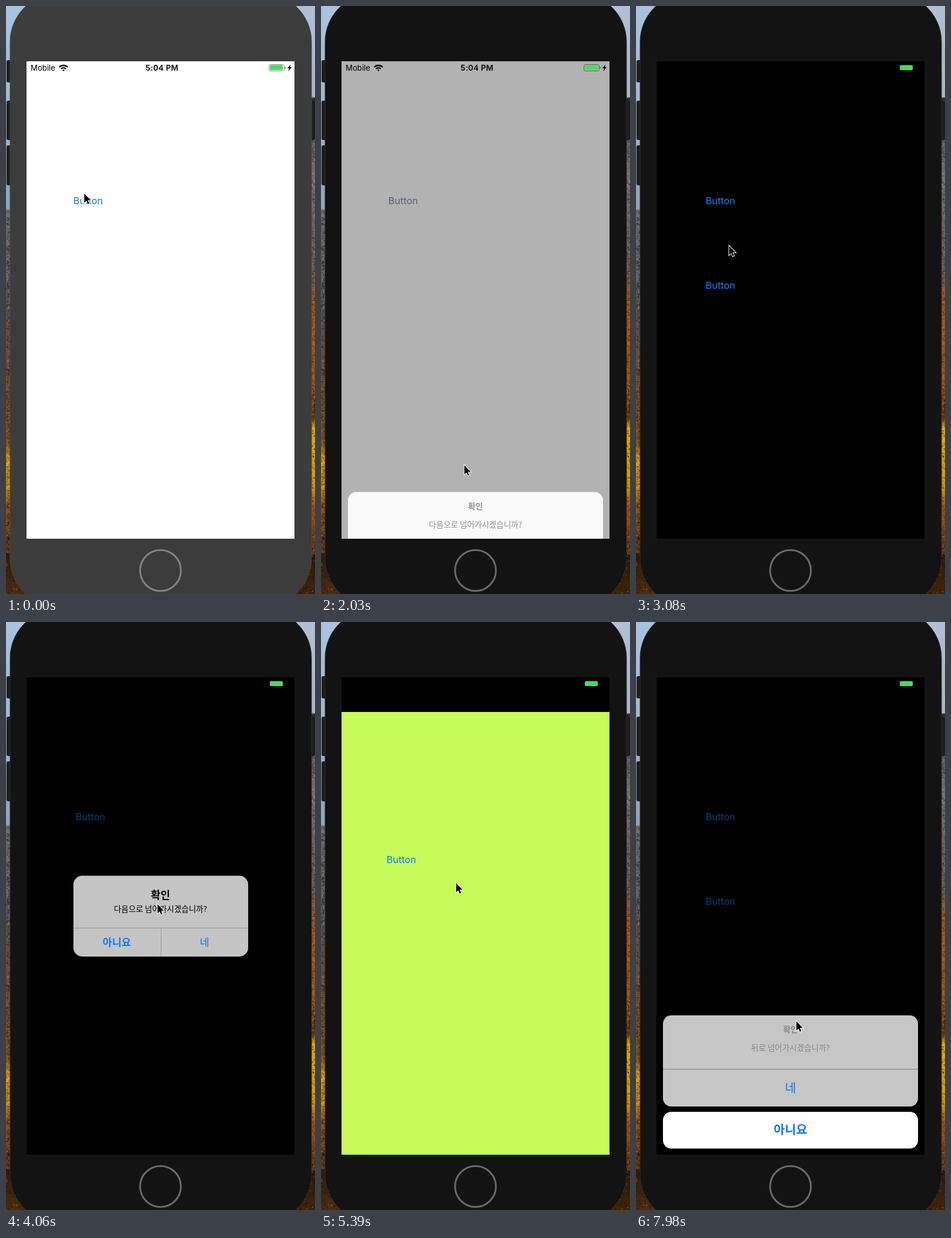
Animation, 527 px wide and 1000 px high, one loop 8000 ms. Source, as an HTML page with a canvas:

```html
<!DOCTYPE html>
<html lang="ko">
<head>
<meta charset="utf-8">
<style>
html, body { margin: 0; width: 100%; height: 100%; overflow: hidden; background: #222 }
canvas { display: block }
</style>
</head>
<body>
<canvas id="stage" width="527" height="1000"></canvas>
<script>
const ctx = document.getElementById('stage').getContext('2d');
const LOOP = 8000, STEP = 70;
const SCREEN = { x: 35, y: 94, w: 457, h: 812 };
const LATIN = 'Inter, sans-serif';
const KOREAN = '"Noto Sans CJK KR", "Noto Sans CJK", sans-serif';
const LIME = '#c6fb5a', BLUE = '#0a7aff';

// Pointer stops: time, x, y
const POINTER = [
  [0, 133, 318], [280, 133, 331], [980, 133, 331], [1470, 250, 757], [1600, 250, 757],
  [1750, 244, 780], [2520, 244, 780], [3200, 140, 327], [3750, 140, 327], [4060, 258, 479],
  [4450, 338, 540], [5100, 338, 540], [5390, 230, 443], [5750, 136, 343], [6600, 136, 343],
  [7200, 138, 470], [7600, 138, 470], [7980, 273, 678]
];

const clamp = v => Math.min(1, Math.max(0, v));
const ramp = (t, start, length) => clamp((t - start) / length);
const glide = (t, start, length = 500) => 1 - (1 - ramp(t, start, length)) ** 3.8;
const mix = (a, b, k) => `rgb(${a.map((v, i) => Math.round(v + (b[i] - v) * k))})`;

function rect(x, y, w, h, fill) {
  ctx.fillStyle = fill;
  ctx.fillRect(x, y, w, h);
}

function box(x, y, w, h, r, fill, stroke) {
  ctx.beginPath();
  ctx.roundRect(x, y, w, h, r);
  if (fill) { ctx.fillStyle = fill; ctx.fill(); }
  if (stroke) { ctx.strokeStyle = stroke; ctx.lineWidth = 1; ctx.stroke(); }
}

function label(text, x, y, size, color, { weight = 400, family = KOREAN, align = 'center', spacing = 0 } = {}) {
  ctx.font = `${weight} ${size}px ${family}`;
  ctx.textAlign = align;
  ctx.letterSpacing = spacing + 'px';
  ctx.fillStyle = color;
  ctx.fillText(text, x, y);
}

function faded(alpha, draw) {
  ctx.save();
  ctx.globalAlpha *= alpha;
  draw();
  ctx.restore();
}

function makeWallpaper() {
  const wall = document.createElement('canvas');
  wall.width = 527;
  wall.height = 1000;
  const g = wall.getContext('2d');
  const side = (x, w, stops) => {
    const fill = g.createLinearGradient(0, 0, 0, 1000);
    stops.split(' ').forEach(s => {
      const [at, color] = s.split('#');
      fill.addColorStop(+at, '#' + color);
    });
    g.fillStyle = fill;
    g.fillRect(x, 0, w, 1000);
  };
  side(0, 264, '0#a9c2e0 .2#9db6d0 .345#8ba3bb .347#6b6b70 .5#57504e .62#6b4a30 .74#7a4a18 .77#e0a000 .82#d89000 .85#8a4a10 .93#5a3010 .932#2e1c08 1#4a2c10');
  side(264, 263, '0#b0bfd6 .155#a9b5c8 .156#303236 .28#74706c .45#6a5a50 .5#a0521a .65#9a5010 .7#5a2c08 .716#e0a800 .82#dc9a00 .85#a04a10 .93#6a3810 .932#2a1a08 1#402408');
  let seed = 7;
  const random = () => (seed = seed * 16807 % 2147483647) / 2147483647;
  for (let i = 0; i < 1900; i++) {
    const right = random() < .5, top = right ? 156 : 347;
    const y = top + random() * (1000 - top);
    const x = random() * (y > 940 ? 36 : 8);
    g.fillStyle = random() < .65 ? 'rgba(0,0,0,.3)' : y > 500 ? 'rgba(225,130,20,.35)' : 'rgba(180,180,180,.25)';
    g.fillRect(right ? 526 - x : x, y, 1 + random() * 2, 1 + random() * 2);
  }
  return wall;
}
const wallpaper = makeWallpaper();

function phone(t) {
  const focused = t >= 350;
  ctx.drawImage(wallpaper, 0, 0);
  for (const [x, y, h] of [[1, 92, 38], [1, 161, 67], [1, 237, 68], [518, 161, 67]])
    box(x, y, 9, h, 3, '#1d1d1d');
  box(7, -21, 514, 1042, 82, focused ? '#131313' : '#3c3c3c', focused ? '#2c2c2c' : '#464646');
  ctx.beginPath();
  ctx.arc(263.5, 960, 34.8, 0, 7);
  ctx.strokeStyle = t < 1960 ? '#838383' : '#6a6a6a';
  ctx.lineWidth = 3;
  ctx.stroke();
}

function statusBar() {
  label('Mobile', 42, 110, 13.2, '#000', { family: LATIN, align: 'left' });
  label('5:04 PM', 266, 110, 13.2, '#000', { family: LATIN, weight: 600, spacing: .3 });
  ctx.save();
  ctx.beginPath();
  ctx.moveTo(98, 111);
  ctx.arc(98, 111, 12, -Math.PI * .75, -Math.PI * .25);
  ctx.clip();
  ctx.strokeStyle = '#000';
  ctx.lineWidth = 2.3;
  for (const r of [1.5, 5.8, 10]) {
    ctx.beginPath();
    ctx.arc(98, 111, r, 0, 7);
    ctx.stroke();
  }
  ctx.restore();
  box(448.5, 99.5, 26, 11, 3, null, 'rgba(0,0,0,.45)');
  box(475.5, 103, 1.5, 4, 1, 'rgba(0,0,0,.45)');
  box(450, 100.6, 22, 8.4, 1.5, '#4cd964');
  ctx.fillStyle = '#000';
  ctx.fill(new Path2D('M485 99.5L480 106H483L481.5 111L487 104H484Z'));
}

// A pressed button goes pale, then recovers after release.
const pressAlpha = (t, at) => t < at ? 1 : .25 + .75 * ramp(t, at + 110, 400);

function button(x, y, color, alpha = 1) {
  faded(alpha, () => label('Button', x, y, 16.4, color, { family: LATIN }));
}

function sheet(shown, message, fill, line, ink) {
  if (shown <= 0) return;
  ctx.save();
  ctx.translate(0, (1 - shown) * 237);
  box(46, 669, 435, 155, 14, fill);
  rect(46, 760, 435, 1, line);
  label('확인', 263.5, 698, 13.6, ink, { weight: 600 });
  label(message, 263.5, 729, 13.55, ink);
  label('네', 263.5, 799.5, 20.8, BLUE);
  box(46, 833, 435, 62.5, 14, '#fff');
  label('아니요', 263.5, 871, 20.8, BLUE, { weight: 600 });
  ctx.restore();
}

function alertBox(t) {
  const shown = glide(t, 3480, 350) * (1 - ramp(t, 4630, 250));
  if (!shown) return;
  const scale = t < 4600 ? 1.2 - .2 * shown : 1;
  faded(shown, () => {
    ctx.translate(264, 500);
    ctx.scale(scale, scale);
    ctx.translate(-264, -500);
    box(115, 431.5, 298, 137.5, 15, '#c4c4c4');
    rect(115, 520, 298, 1, '#989898');
    rect(264, 520, 1, 49, '#989898');
    label('확인', 263.5, 470.5, 17.9, '#000', { weight: 600 });
    label('다음으로 넘어가시겠습니까?', 263.5, 493, 13.55, '#000');
    label('아니요', 189, 551, 17.5, BLUE, { weight: 600 });
    label('네', 338.5, 551, 17.5, BLUE);
  });
}

function firstScreen(t) {
  const dim = glide(t, 520, 400) * (1 - ramp(t, 1950, 300));
  rect(SCREEN.x, SCREEN.y, SCREEN.w, SCREEN.h, '#fff');
  button(140, 337, mix([20, 118, 212], [150, 150, 150], dim), pressAlpha(t, 350));
  rect(SCREEN.x, SCREEN.y, SCREEN.w, SCREEN.h, `rgba(0,0,0,${.41 * dim})`);
  sheet(glide(t, 542) * (1 - glide(t, 1930, 400)), '다음으로 넘어가시겠습니까?', '#f9f9f9', '#deeaea', '#8c8f91');
}

function secondScreen(t) {
  const dim = glide(t, 3480, 350) * (1 - ramp(t, 4630, 250)) + glide(t, 7540, 400);
  const color = mix([22, 130, 255], [9, 60, 128], dim);
  rect(SCREEN.x, SCREEN.y, SCREEN.w, SCREEN.h, '#000');
  button(144, 337, color, pressAlpha(t, 3330));
  button(144, 480.5, color, pressAlpha(t, 7370));
}

function thirdScreen(t) {
  rect(SCREEN.x, SCREEN.y, SCREEN.w, SCREEN.h, LIME);
  button(137, 351, BLUE, pressAlpha(t, 6280));
}

function slideUp(hidden, draw, t) {
  if (hidden >= 1) return;
  ctx.save();
  ctx.translate(0, Math.round(hidden * SCREEN.h));
  draw(t);
  ctx.restore();
}

const arrow = new Path2D('M0 0V15.5L3.6 12.2L6 17.8L8.4 16.8L6 11.2H10.9Z');
function pointer(t) {
  const i = Math.max(1, POINTER.findIndex(p => p[0] >= t));
  const [t0, x0, y0] = POINTER[i - 1], [t1, x1, y1] = POINTER[i];
  const k = ramp(t, t0, t1 - t0);
  ctx.save();
  ctx.translate(x0 + (x1 - x0) * k + .5, y0 + (y1 - y0) * k + 1);
  ctx.strokeStyle = '#fff';
  ctx.lineWidth = 2;
  ctx.stroke(arrow);
  ctx.fillStyle = '#000';
  ctx.fill(arrow);
  ctx.restore();
}

function render(now) {
  const t = Math.floor(now % LOOP / STEP) * STEP;
  phone(t);
  ctx.save();
  ctx.beginPath();
  ctx.rect(SCREEN.x, SCREEN.y, SCREEN.w, SCREEN.h);
  ctx.clip();
  firstScreen(t);
  slideUp(1 - glide(t, 2400), secondScreen, t);
  slideUp(t < 6396 ? 1 - glide(t, 5141) : glide(t, 6396), thirdScreen, t);
  statusBar();
  alertBox(t);
  sheet(glide(t, 7540), '뒤로 넘어가시겠습니까?', '#c6c6c6', '#7c7c7c', '#858789');
  ctx.restore();
  pointer(t);
  requestAnimationFrame(() => render(performance.now()));
}
render(performance.now());
</script>
</body>
</html>
```
